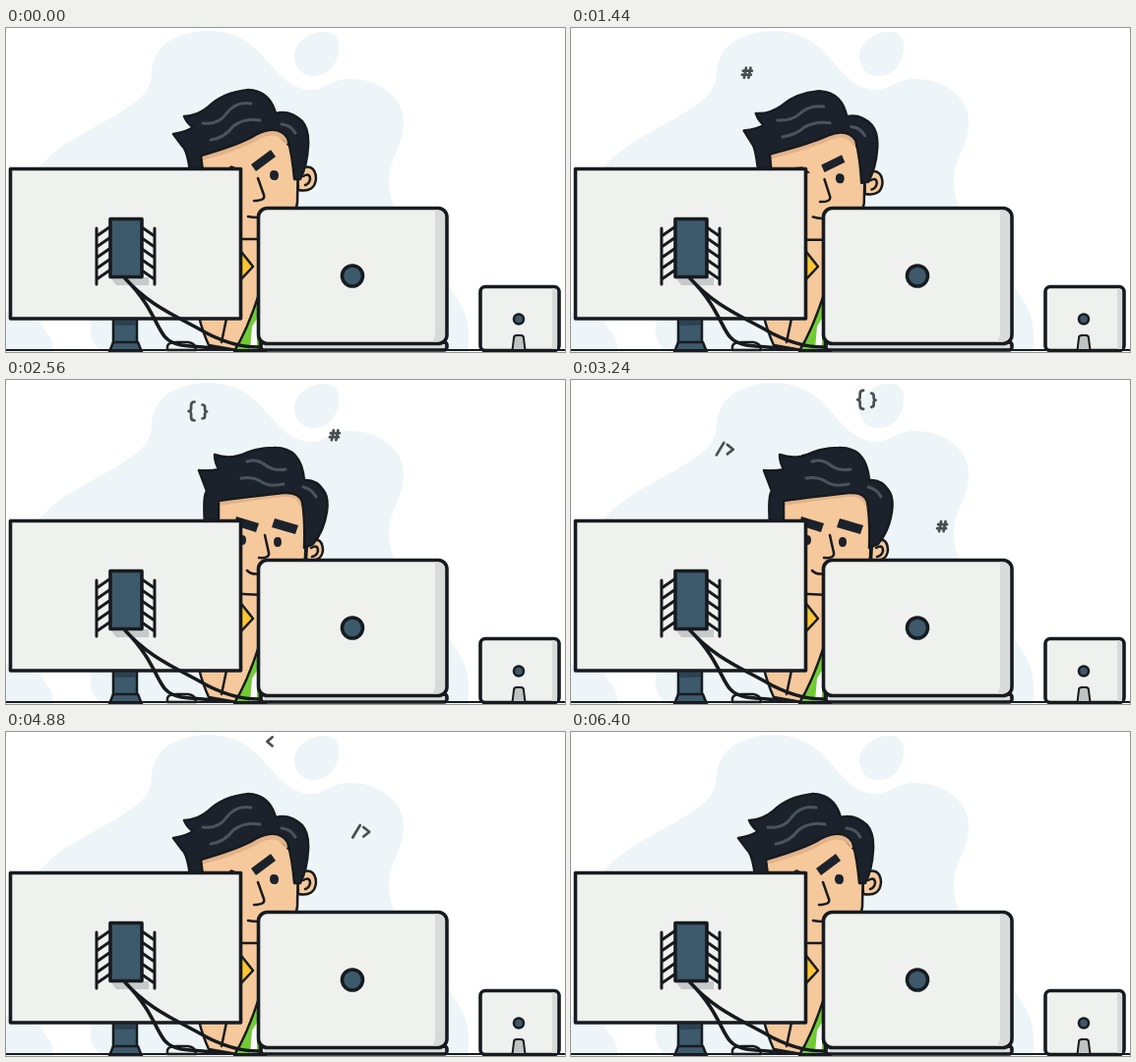
An HTML page for the animation above (6.64 s loop, 568x330 px).

```html
<!DOCTYPE html>
<html lang="en">
<head>
<meta charset="utf-8">
<title>Developer behind screens</title>
<style>
html, body { margin: 0; width: 100%; height: 100%; overflow: hidden; background: #fff }
svg { display: block; width: 568px; height: 330px }
.ink { stroke: #171b1f; stroke-width: 2.5; stroke-linejoin: round; stroke-linecap: round }
.thick { stroke-width: 3.6 }
.line { fill: none }
.pale { fill: #edf5f8 }
.skin { fill: #f5c99c }
.hair { fill: #1c222b }
.case { fill: #eff1ee }
.shade { fill: #d9dbdb }
.blue { fill: #3d5a6c }
.strand { fill: none; stroke: #4b535d; stroke-width: 3; stroke-linecap: round }
.shadow { fill: none; stroke: #e3b48a; stroke-width: 6 }
.symbol { fill: none; stroke: #4a4e53; stroke-width: 2.7; stroke-linecap: round; stroke-linejoin: round }
</style>
</head>
<body>
<svg viewBox="0 0 568 330">
  <g class="pale">
    <path d="M32 143C60 112 88 105 125 80C156 60 143 47 152 29C163 4 207-3 233 8C267 21 274 60 308 63C326 64 327 52 350 52C382 52 405 72 404 98C403 122 388 135 389 158C391 205 437 230 449 260C458 278 475 290 469 330H98C80 317 88 305 86 296L30 200Z"/>
    <path d="M0 290Q30 290 38 306Q48 316 48 330H0Z"/>
    <path d="M293 31C291 14 312 2 326 4C341 6 340 22 335 34C328 52 297 57 293 31Z"/>
  </g>
  <g id="symbols"></g>

  <g class="ink">
    <path class="skin" d="M196 294Q200 310 206 323L240 329H264V200H225Z"/>
    <path fill="#70cb35" d="M232 329Q246 306 258 268V329Z"/>
    <path fill="#fff" stroke="none" d="M248 327L250 304L255 296V327Z"/>
    <path class="line" d="M224 296L219 320"/>
    <path fill="#fdc62f" d="M236 224L251 243L236 259Z"/>
  </g>
  <g id="head"></g>

  <g class="ink">
    <rect class="blue" x="109" y="290" width="24" height="32"/>
    <path fill="#2b4352" stroke="none" d="M110 298H132V303H110Z"/>
    <path class="blue" d="M105 330L109 320H134L138 330Z"/>
    <path class="case" d="M164 328V324Q165 320 174 320H185Q193 321 193 328Z"/>
    <rect class="case thick" x="4.5" y="143.5" width="234" height="152.5"/>
    <path fill="#c7cacb" stroke="none" d="M106 254H145V262H112Z"/>
    <path id="fins" class="line" stroke-width="3"/>
    <rect class="blue thick" x="106" y="194.500" width="32" height="59"/>
    <path class="line thick" d="M121 255C148 282 152 303 161 314Q168 323 187 324L225 327M121 255C144 281 170 292 197 307Q228 325 256 325"/>
  </g>

  <g class="ink thick">
    <rect class="shade" x="259" y="320" width="189" height="8" rx="3"/>
    <rect class="case" x="256.500" y="183.500" width="191.500" height="138" rx="9"/>
    <path class="shade" stroke="none" d="M436 185.500H439Q446 186 446 193V312Q446 319 439 319.500H433Q436 316 436 312Z"/>
    <circle class="blue" cx="352" cy="252.500" r="10.500"/>
    <rect class="case" x="482" y="263.500" width="80" height="65" rx="5"/>
    <path class="shade" stroke="none" d="M555 265.500H557Q560 266 560 269V327H555Z"/>
  </g>
  <g class="ink">
    <circle class="blue" cx="521" cy="296.500" r="5"/>
    <path fill="#bfc3c4" stroke-width="2" d="M514.500 328L516 316Q516 313 519 313H523Q526 313 526 316L527.500 328Z"/>
    <path d="M0 328H568" stroke-width="2"/>
  </g>
</svg>
<script>
const LOOP = 6640;
const $ = id => document.getElementById(id);

function addPath(parent, cls, d) {
  const p = document.createElementNS('http://www.w3.org/2000/svg', 'path');
  p.setAttribute('class', cls);
  p.setAttribute('d', d);
  return parent.appendChild(p);
}

// Cooling fins on both sides of the monitor mount
let fins = 'M92 204V261M151 204V261';
for (let y = 203; y < 250; y += 11) fins += `M105 ${y}L92 ${y + 9}M138 ${y}L151 ${y + 9}`;
$('fins').setAttribute('d', fins);

// Head parts: class, pose looking left, pose looking forward
const head = [
  ['ink skin', 'M296 144Q314 136 315 153Q314 168 297 165Z',
    'M306 166Q321 157 322 173Q321 186 305 183Z'],
  ['ink line', 'M302 151Q309 147 309 154Q308 159 304 160',
    'M310 171Q317 167 317 174Q316 179 311 180'],
  ['ink skin', 'M196 120L200 150L206 200Q212 215 240 215L262 215Q292 206 296 178L297 130L270 100Z',
    'M214 110L216 150L216 200Q222 217 241 218L264 219Q302 210 304 180L306 130L290 110Z'],
  ['shadow', 'M198 132Q240 121 257 110Q278 100 287 117',
    'M216 125Q255 119 281 116Q298 114 302 128'],
  ['hair', 'M225 143L229 140L240 145L238 150Z', 'M234 139L257 146L254 155L232 148Z'],
  ['hair', 'M249 139L269 124L274 131L254 146Z', 'M273 141L297 148L294 157L270 150Z'],
  ['hair', 'M268 150Q268 145 272 145Q277 145 277 150Q277 155 273 155Q268 155 268 150Z',
    'M272 165Q272 160 276 160Q280 160 280 165Q280 170 276 170Q272 170 272 165Z'],
  ['hair', 'M228 153Q228 149 231 149Q235 149 235 153Q235 157 231 157Q228 157 228 153Z',
    'M236 163Q236 158 240 158Q244 158 244 163Q244 168 240 168Q236 168 236 163Z'],
  ['ink line', 'M256 153L262 170Q264 176 252 176', 'M263 158L267 176Q268 182 257 181'],
  ['ink line', 'M246 192Q251 193 258 193', 'M245 194Q250 199 258 197'],
  ['ink hair', 'M170 108Q184 106 190 101Q184 97 181 90Q194 90 206 80Q220 66 246 63Q268 64 274 87Q288 83 301 95Q308 103 307 120Q306 140 299 154L293 154Q291 130 286 112Q277 98 255 108Q240 118 198 130L200 146L187 146Q184 124 179 120Z',
    'M196 92Q208 93 216 91Q212 83 212 76Q228 82 245 74Q257 69 272 69Q300 68 303 102Q316 101 323 113Q328 120 326 134Q323 154 312 167L303 171Q304 142 301 124Q298 114 282 115Q255 118 216 123L216 146L202 146Q200 118 204 113Z'],
  ['strand', 'M200 97Q216 99 224 87Q234 74 249 77', 'M245 83Q256 80 264 87Q272 93 284 91'],
  ['strand', 'M208 114Q222 112 231 100Q243 91 258 94', 'M239 100Q252 98 260 104Q268 109 282 106'],
  ['strand', 'M280 98Q290 99 294 107', 'M302 109Q311 111 315 119']
].map(([cls, a, b]) => ({ el: addPath($('head'), cls, a), a, b }));

const number = /-?[\d.]+/g;
function mix(a, b, k) {
  const to = b.match(number);
  let i = 0;
  return a.replace(number, n => (+n + (to[i++] - n) * k).toFixed(2));
}

// Code symbols with their launch times
const symbols = [
  [560, 'M-1-5L-3 5M3.500-5L1.500 5M-4-2H5M-5 2H4'],
  [1550, 'M-3-9.500Q-6.500-9.500-6.500-6V-3Q-6.500 0-9 0Q-6.500 0-6.500 3V6Q-6.500 9.500-3 9.500M5-6.500Q7.500-6.500 7.500-4V-2Q7.500 .5 9.500 .5Q7.500 .5 7.500 3V5Q7.500 7.500 5 7.500'],
  [2565, 'M-8.500 6L-1-6.500M2.500-4.500L8.500 .3L2.500 5'],
  [3398, 'M2.500-4.500L-2.800 0L2.500 4.500']
].map(([start, d]) => ({ start, el: addPath($('symbols'), 'symbol', d) }));

// Flight arc: time, x, y
const arc = [
  [0, 118, 154], [240, 129, 124], [440, 138, 100], [640, 153, 75], [840, 174, 50],
  [1240, 225, 12], [1500, 271, 10], [1690, 300, 20], [1940, 328, 48],
  [2320, 361, 102], [2680, 377, 149], [3000, 387, 194]
];

// Cubic Hermite interpolation along the arc
function along(t, axis) {
  const last = arc.length - 1;
  let i = 0;
  while (i < last - 1 && t > arc[i + 1][0]) i++;
  const slope = j => {
    const p = arc[Math.max(j - 1, 0)], q = arc[Math.min(j + 1, last)];
    return (q[axis] - p[axis]) / (q[0] - p[0]);
  };
  const p = arc[i], q = arc[i + 1], span = q[0] - p[0];
  const u = (t - p[0]) / span, v = 1 - u;
  return v * v * ((1 + 2 * u) * p[axis] + u * span * slope(i))
    + u * u * ((3 - 2 * u) * q[axis] - v * span * slope(i + 1));
}

function ramp(t, from, to) {
  const u = Math.min(1, Math.max(0, (t - from) / (to - from)));
  return u * u * (3 - 2 * u);
}

let shown = -1;
function draw(now) {
  const t = now % LOOP;
  const turn = ramp(t, 1320, 1720) - ramp(t, 4440, 4840);
  if (turn !== shown) {
    for (const { el, a, b } of head) el.setAttribute('d', mix(a, b, turn));
    shown = turn;
  }
  for (const { start, el } of symbols) {
    const age = t - start, flying = age >= 0 && age <= 3000;
    el.style.display = flying ? '' : 'none';
    if (flying) el.setAttribute('transform', `translate(${along(age, 1)} ${along(age, 2)})`);
  }
}

const begin = performance.now();
function tick() {
  draw(performance.now() - begin);
  requestAnimationFrame(tick);
}
tick();
</script>
</body>
</html>
```
